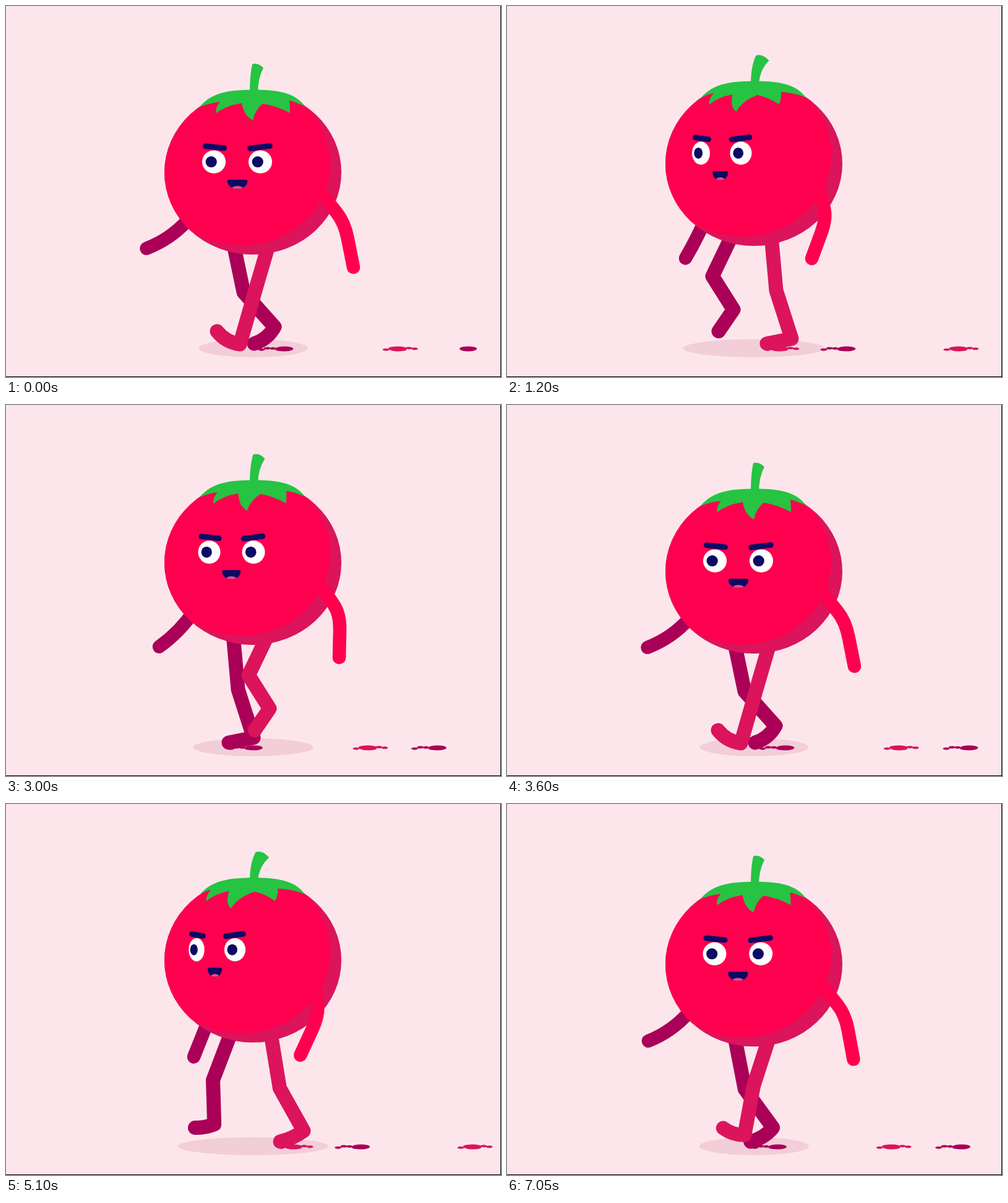
Recreate the animation shown at these times as an HTML page with a canvas. Size 800 by 600 pixels, loop 7.2 s.

```html
<!DOCTYPE html>
<html lang="en">
<head>
<meta charset="utf-8">
<title>Walking tomato</title>
<style>
html, body { margin: 0; width: 100%; height: 100%; overflow: hidden; }
canvas { display: block; }
</style>
</head>
<body>
<canvas id="stage" width="800" height="600"></canvas>
<script>
const g = document.getElementById('stage').getContext('2d');
const RED = '#ff004f', CRIMSON = '#db145b', DARK = '#aa0058', NAVY = '#0c0a63', GREEN = '#27c343';
const LOOP = 7200, STRIDE = 3600, STEP = 150;

// Both legs walk alike, half a stride apart; heavy is the offset of the print's main blot
const FAR = { color: DARK, shift: -60, delay: STRIDE / 2, pace: .0825, heavy: 14 };
const NEAR = { color: CRIMSON, shift: 0, delay: 0, pace: .0805, heavy: -4 };

// Six evenly spaced poses of a stride: knee x y, ankle x y, toe x y, foot bend
const POSES = [
  [402, 463, 378, 547, 341, 526, -.2],  // heel strikes
  [413, 480, 420, 546, 379, 546, 0],    // foot flat
  [435, 460, 460, 538, 420, 546, 0],    // heel lifts
  [444, 463, 494, 519, 461, 546, -.2],  // toe pushes off
  [421, 476, 470, 508, 460, 546, -.2],  // foot trails
  [392, 437, 426, 491, 402, 526, 0]     // knee swings forward
];

// Catmull-Rom curve through the poses, endless in time
function pose(time) {
  const n = POSES.length, s = time / STRIDE * n, i = Math.floor(s), u = s - i;
  const [a, b, c, d] = [-1, 0, 1, 2].map(k => POSES[((i + k) % n + n) % n]);
  return b.map((v, j) => v + u / 2 * (c[j] - a[j]
    + u * (2 * a[j] - 5 * v + 4 * c[j] - d[j] + u * (3 * (v - c[j]) + d[j] - a[j]))));
}

function oval(x, y, rx, ry, color) {
  g.beginPath();
  g.ellipse(x, y, rx, ry, 0, 0, 7);
  g.fillStyle = color;
  g.fill();
}

function stroke(color, width) {
  g.strokeStyle = color;
  g.lineWidth = width;
  g.stroke();
}

// Line bowed sideways by a share of its length
function bow(ax, ay, bx, by, bend) {
  g.lineTo(ax, ay);
  g.quadraticCurveTo((ax + bx) / 2 - bend * (by - ay), (ay + by) / 2 + bend * (bx - ax), bx, by);
}

function footprints(t, { color, shift, delay, pace, heavy }) {
  for (let age = t - delay + STRIDE; age > 450 - STRIDE; age -= STRIDE) {
    if (age < 450) continue;
    const x = 347.5 + shift + pace * age;
    oval(x + heavy, 554.4, 14, 4, color);
    for (let i = 0; i < 6; i++) oval(x - 23 + 9.2 * i, 554.3 + 1.4 * Math.cos(2.2 * i), 5.5, 2, color);
  }
  const late = t - delay + 2 * STRIDE;
  oval(347.5 + shift + pace * late + heavy, 554.4, 14, 4, color);
}

function leg(t, y, { color, shift, delay }) {
  const [kx, ky, ax, ay, tx, ty, bend] = pose(t - delay);
  g.save();
  g.translate(shift, 0);
  g.beginPath();
  g.moveTo(426.5, y + 110);
  g.lineTo(kx, ky);
  bow(ax, ay, tx, ty, bend);
  stroke(color, 23);
  g.restore();
}

function farArm(c) {
  g.beginPath();
  bow(-84 - 22 * c, 78, -131 - 41 * c, 146 - 17 * c - 6 * c * c, -.06 * (1 + c));
  stroke(DARK, 21.5);
}

function nearArm(c) {
  const sx = 106 + 6 * c, sy = 36;
  const ex = 131 + 23 * c - 6 * c * c, ey = 85 - 4 * c;
  const hx = 116.5 + 46 * c, hy = 153.5, soft = .35;
  g.beginPath();
  g.moveTo(sx, sy);
  g.lineTo(ex + (sx - ex) * soft, ey + (sy - ey) * soft);
  g.quadraticCurveTo(ex, ey, ex + (hx - ex) * soft, ey + (hy - ey) * soft);
  g.lineTo(hx, hy);
  stroke(RED, 21.5);
}

function body() {
  oval(0, 0, 143, 133, CRIMSON);
  g.save();
  g.clip();
  oval(-19, -15, 144, 133, RED);
  g.restore();
}

function crown(c) {
  g.fillStyle = GREEN;
  g.beginPath();
  g.moveTo(-5, -128);
  g.quadraticCurveTo(-5, -158, 2 - 3 * c, -175);
  g.quadraticCurveTo(12 - 4 * c, -178, 22 - 5 * c, -167.5 - 1.5 * c);
  g.quadraticCurveTo(9 - c, -152, 8, -128);
  g.fill();

  g.beginPath();
  g.moveTo(-86, -106);
  g.bezierCurveTo(-66, -130, -36, -133.5, 2, -133.5);
  g.bezierCurveTo(40, -133.5, 68, -129, 84, -107);
  g.quadraticCurveTo(65, -115, 49 + 10 * c, -116);
  g.quadraticCurveTo(50 + 10 * c, -106, 47 + 13 * c, -96);
  g.quadraticCurveTo(27 + 10 * c, -108, 9 + 7 * c, -111);
  g.quadraticCurveTo(-11 + 15 * c, -102, -19 + 19 * c, -84);
  g.quadraticCurveTo(-31 + 16 * c, -92, -29 + 11 * c, -112);
  g.quadraticCurveTo(-53 + 9 * c, -108, -68 + 8.5 * c, -95.5);
  g.quadraticCurveTo(-69 + 8 * c, -105, -61 + 8 * c, -114);
  g.quadraticCurveTo(-74 + 4 * c, -112, -86, -106);
  g.fill();
}

function eye(x, rx, lid) {
  g.save();
  g.beginPath();
  g.rect(x - 30, -36 + 38 * lid, 60, 60);
  g.clip();
  oval(x, -17, rx, 18.7, '#fff');
  oval(x - 4.3, -17, rx * .48, 9, NAVY);
  g.restore();
}

function brow(x, half, tilt) {
  g.beginPath();
  g.moveTo(x - half, -40.8 - tilt);
  g.lineTo(x + half, -40.8 + tilt);
  stroke(NAVY, 9);
}

function mouth(x, w) {
  g.save();
  g.beginPath();
  g.moveTo(x - w + 2, 12);
  g.lineTo(x + w - 2, 12);
  g.quadraticCurveTo(x + w, 12, x + w, 14);
  g.bezierCurveTo(x + w, 31, x - w, 31, x - w, 14);
  g.quadraticCurveTo(x - w, 12, x - w + 2, 12);
  g.fillStyle = NAVY;
  g.fill();
  g.clip();
  oval(x, 28, w * .65, 6, '#e0508a');
  g.restore();
}

function face(c, lid) {
  const lx = -78 + 15 * c, lr = 16.5 + 3.5 * c - c * c;
  const rx = -10 + 22 * c, rr = 18 + c;
  eye(lx, lr, lid);
  eye(rx, rr, lid);
  brow(lx + 1.5, lr - 4, 1.5);
  brow(rx - .5, rr - 3.2, -1.9);
  mouth(-44.5 + 19.5 * c, 13.7 + 2.5 * c);
}

function draw(t) {
  const angle = 2 * Math.PI * t / STRIDE;
  const c = Math.cos(angle);  // turn of the body, 1 when it faces the viewer most
  const y = 271.3 + 20.3 * Math.cos(2 * angle - 1.68);
  const lid = Math.max(0, .95 - Math.abs(t - 6150) / STEP * .45);

  g.fillStyle = '#fce6ec';
  g.fillRect(0, 0, 800, 600);
  g.lineCap = g.lineJoin = 'round';

  oval(399.5, 553.5, 106 - 18 * c, 14.5, '#f2ced8');
  for (const side of [FAR, NEAR]) footprints(t, side);
  for (const side of [FAR, NEAR]) leg(t, y, side);

  g.save();
  g.translate(399, y);
  farArm(c);
  body();
  crown(c);
  face(c, lid);
  nearArm(c);
  g.restore();

  g.fillStyle = '#000';
  g.fillRect(799, 0, 1, 600);
  g.fillRect(0, 599, 800, 1);
}

const start = performance.now();
function tick() {
  const t = (performance.now() - start) % LOOP;
  draw(Math.floor(t / STEP) * STEP);
  requestAnimationFrame(tick);
}
tick();
</script>
</body>
</html>
```
